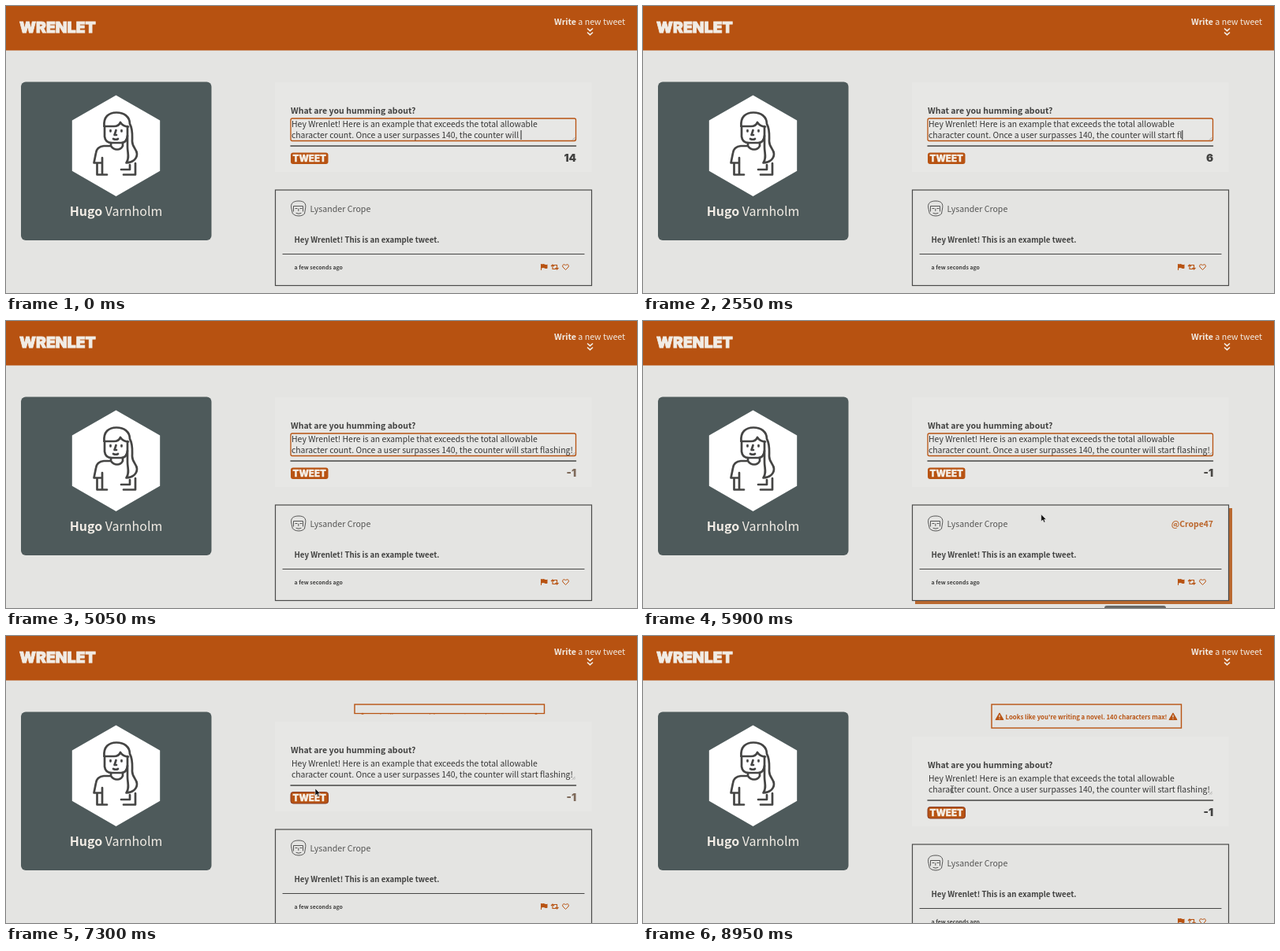
An HTML page for the animation above (9000 ms loop, 800 by 365 pixels).

```html
<!DOCTYPE html>
<html lang="en">
<head>
<meta charset="utf-8">
<title>Wrenlet</title>
<style>
  html, body { margin: 0; width: 100%; height: 100%; overflow: hidden; background: #e4e4e2; }
  svg { display: block; width: 100vw; height: 100vh; }
  text { font-family: "Noto Sans CJK JP", "Noto Sans CJK SC", "Noto Sans", sans-serif; font-weight: 300; white-space: pre; }
  .bold { font-weight: 700; }
  .heavy { font-family: Inter, "Open Sans", sans-serif; font-weight: 900; }
  .ink { fill: #424241; }
  .soft { fill: #555554; }
  .pale { fill: #f1ece5; }
  .orange { fill: #b85312; }
  .line { fill: none; stroke: #454544; stroke-linecap: round; stroke-linejoin: round; }
  .edge { fill: none; stroke: #b85312; }
</style>
</head>
<body>
<svg viewBox="0 0 800 365" preserveAspectRatio="none">
  <defs>
    <clipPath id="noticeClip"><rect id="noticeMask" x="441" y="86" width="243" height="0"/></clipPath>
    <g id="warning">
      <path class="orange" d="M0-4.6 5 4H-5Z" stroke="#b85312" stroke-linejoin="round"/>
      <path d="M0-2V1M0 2.3V3.2" stroke="#e4e4e2" stroke-width="1.3"/>
    </g>
  </defs>

  <rect width="800" height="365" fill="#e4e4e2"/>
  <rect width="800" height="56.5" fill="#b75211"/>
  <text class="heavy pale" x="17" y="33.6" font-size="19.4" stroke="#f1ece5" stroke-width=".8">WRENLET</text>
  <text class="pale" x="785" y="23.5" font-size="10.6" text-anchor="end"><tspan class="bold">Write</tspan> a new tweet</text>
  <path d="m737 28.5 3.5 3.2 3.5-3.2m-7 5 3.5 3.2 3.5-3.2" fill="none" stroke="#f1ece5" stroke-width="1.6"/>

  <rect x="19" y="96.500" width="241.500" height="201.500" rx="6" fill="#4e5a5b"/>
  <path d="m139.5 113.5 55.7 32v64.3l-55.7 32.2-55.7-32.2v-64.3Z" fill="#fff"/>
  <g class="line" stroke-width="2.7">
    <path d="M124.500 153C123.500 141 130 135.500 140 135.500C150 135.500 157 141 157 150C161 157 160 164 160 172C160 180 166 182 166 188C166 195 160 199 152.500 199.500C157 193 154 187 154 179V153"/>
    <path d="M124.500 153H137Q143 153 145 148Q148 153 155 153.500M125 153V166Q126 174 134 174H146Q153 174 154 165"/>
    <path d="M132.500 158v1.500M146.500 158v1.500M139.500 158L137.500 164H140M136 169q3.500 1.500 6 0"/>
    <path d="M133 174V178C137 184 145 184 148 178V175M132 178H124Q115 179 114 187L111.500 199.500H122M122 193V214.500M115.500 200V214.500H128M164 200V214.500H149M157 202V208H146"/>
  </g>
  <text class="pale" x="139.500" y="267" font-size="16" text-anchor="middle"><tspan class="bold">Hugo</tspan> Varnholm</text>

  <g id="notice" clip-path="url(#noticeClip)">
    <rect id="noticeBox" class="edge" x="442" y="87" width="240.500" height="30" stroke-width="1.4"/>
    <use href="#warning" x="452" y="102.500"/>
    <text class="bold orange" x="562" y="105.500" font-size="7.8" text-anchor="middle">Looks like you're writing a novel. 140 characters max!</text>
    <use href="#warning" x="672" y="102.500"/>
  </g>

  <g id="feed">
    <rect x="341" y="97" width="401.500" height="114" fill="#e7e7e5"/>
    <text class="bold ink" x="361" y="137" font-size="10.55">What are you humming about?</text>
    <rect id="focus" class="edge" x="361" y="143" width="361.500" height="28.500" rx="2" stroke-width="1.3"/>
    <g font-size="10.42" fill="#363636">
      <text x="362" y="154">Hey Wrenlet! Here is an example that exceeds the total allowable</text>
      <text id="typed" x="362" y="167.500"></text>
    </g>
    <path id="caret" d="M0 158v12" stroke="#222"/>
    <path d="m718 170.500 3.500-3.500m-1.200 3.500 1.200-1.200" stroke="#777" stroke-width=".6"/>
    <path class="line" d="M361 178H722.500" stroke-width="1.5"/>
    <rect id="buttonShadow" x="360.500" y="187" width="49.500" height="16" rx="4" fill="#6e4930" opacity=".65"/>
    <rect id="button" class="orange" x="361" y="186.500" width="47.500" height="14.500" rx="3"/>
    <text class="heavy" x="384.700" y="198" font-size="11.500" text-anchor="middle" fill="#f5f0e8" stroke="#f5f0e8" stroke-width=".3">TWEET</text>
    <text id="counter" class="heavy" x="723" y="197.500" font-size="13.500" text-anchor="end"></text>

    <rect id="cardShadow" x="345" y="238" width="402" height="122" fill="#b9682f"/>
    <rect x="341.500" y="234" width="401" height="121.500" fill="#e4e4e2" stroke="#4a4a49" stroke-width="1.2"/>
    <g class="line" stroke-width=".9">
      <path d="M362 258C360 251 364 248 371 248S381 251 379.500 258L378.500 264C376 268 366 268 363.500 264Z"/>
      <path d="M364.500 261V254.500H376.500V261M367 257.500h2M373 257.500h2M370.800 258v2.500M368 263.500q3 1.500 6 0"/>
    </g>
    <text class="soft" x="385.500" y="262" font-size="10.6">Lysander Crope</text>
    <text id="handle" class="bold" x="723" y="262" font-size="10.4" text-anchor="end" fill="#bb662c">@Crope47</text>
    <text class="bold ink" x="365.500" y="301" font-size="9.7">Hey Wrenlet! This is an example tweet.</text>
    <path class="line" d="M351 315.500H733" stroke-width="1.200"/>
    <text class="bold ink" x="365.500" y="334.500" font-size="6.95">a few seconds ago</text>
    <path class="orange" d="M678 328h1v8h-1ZM679 328.500q2-1 4 0t3.500 0v5q-1.800 1-3.500 0t-4 0Z"/>
    <path class="edge" d="M691 331 693 329 695 331M693 329.500V334.500H697M694.500 329.500H698.500V334.500M696.500 333 698.500 335 700.500 333" stroke-width="1.1"/>
    <path class="edge" d="M709.500 335.500 706 332C704.500 329 708 327.500 709.500 330C711 327.500 714.500 329 713 332Z" stroke-width="1"/>
  </g>

  <rect id="tab" x="585" y="362" width="78" height="8" rx="3" fill="#686866"/>
  <path id="arrow" d="M0 0V9L2.200 7.200 3.700 10.400 5.300 9.700 3.900 6.600H6.600Z" fill="#111" stroke="#f4f4f4" stroke-width=".6"/>
  <path id="beam" d="M-1.800-4.500Q0-4.500 0-3.500Q0-4.500 1.800-4.500M0-3.500V3.500M-1.800 4.500Q0 4.500 0 3.500Q0 4.500 1.800 4.500M-1 1H1" fill="none" stroke="#333" stroke-width=".8"/>
</svg>
<script>
  const LOOP = 9000;
  const BASE = "character count. Once a user surpasses 140, the counter will ";
  const TAIL = "start flashing!";
  const OVERFLOW_AT = 4450;
  const FLASH_MS = 750;
  const SLIDE_AT = 7130;
  const SLIDE_MS = 400;
  const keyTimes = [...TAIL].map((c, i) => c === "!" ? OVERFLOW_AT : 1300 + i * 160);
  const path = [[5300, 620, 372], [5900, 505, 246], [6550, 392, 194]];

  const $ = id => document.getElementById(id);
  const show = (id, on) => $(id).setAttribute("visibility", on ? "visible" : "hidden");
  const move = (id, x, y) => $(id).setAttribute("transform", `translate(${x} ${y})`);
  const clamp = x => Math.min(1, Math.max(0, x));
  const swing = x => 0.5 - Math.cos(Math.PI * clamp(x)) / 2;
  const mix = (a, b, k) => a + (b - a) * k;

  function pointer(t) {
    const i = t < path[1][0] ? 0 : 1;
    const [t0, x0, y0] = path[i], [t1, x1, y1] = path[i + 1];
    const u = clamp((t - t0) / (t1 - t0));
    const k = i ? Math.sin(u * Math.PI / 2) : u;
    return [mix(x0, x1, k), mix(y0, y1, k)];
  }

  function drawTyping(t) {
    const count = keyTimes.filter(k => k <= t).length;
    const line = BASE + TAIL.slice(0, count);
    if ($("typed").textContent !== line) $("typed").textContent = line;
    const sinceKey = t - (count ? keyTimes[count - 1] : 0);
    show("caret", t < OVERFLOW_AT && sinceKey % 1000 < 500);
    move("caret", 362.5 + $("typed").getComputedTextLength(), 0);

    $("counter").textContent = 14 - count;
    const glow = t < OVERFLOW_AT ? 0 : (1 - Math.cos((t - OVERFLOW_AT) / FLASH_MS * 2 * Math.PI)) / 2;
    const rgb = [[66, 242], [66, 182], [65, 138]].map(([a, b]) => Math.round(mix(a, b, glow)));
    $("counter").setAttribute("fill", `rgb(${rgb})`);
  }

  function render(t) {
    drawTyping(t);

    const open = swing((t - SLIDE_AT) / SLIDE_MS);
    const shift = 31 * open;
    const clicked = t >= SLIDE_AT;
    move("feed", 0, shift);
    show("notice", open > 0);
    $("noticeBox").setAttribute("height", 30 * open);
    $("noticeMask").setAttribute("height", 30 * open + 2);
    show("focus", !clicked);
    $("button").setAttribute("stroke", clicked ? "#8a3d24" : "none");

    const [x, y] = pointer(t);
    const overCard = t >= path[0][0] && y > 234 && y < 356;
    const overText = 171.5 + shift > y && clicked;
    show("cardShadow", overCard);
    show("handle", overCard);
    show("buttonShadow", x < 408 && y < 201 && y > 186 + shift);
    show("tab", t >= path[0][0] && t < 6200);
    show("arrow", t >= path[0][0] && !overText);
    show("beam", overText);
    move("arrow", x, y);
    move("beam", x, y + 1);
  }

  const start = performance.now();
  function tick() {
    render((performance.now() - start) % LOOP);
    requestAnimationFrame(tick);
  }
  tick();
</script>
</body>
</html>
```
